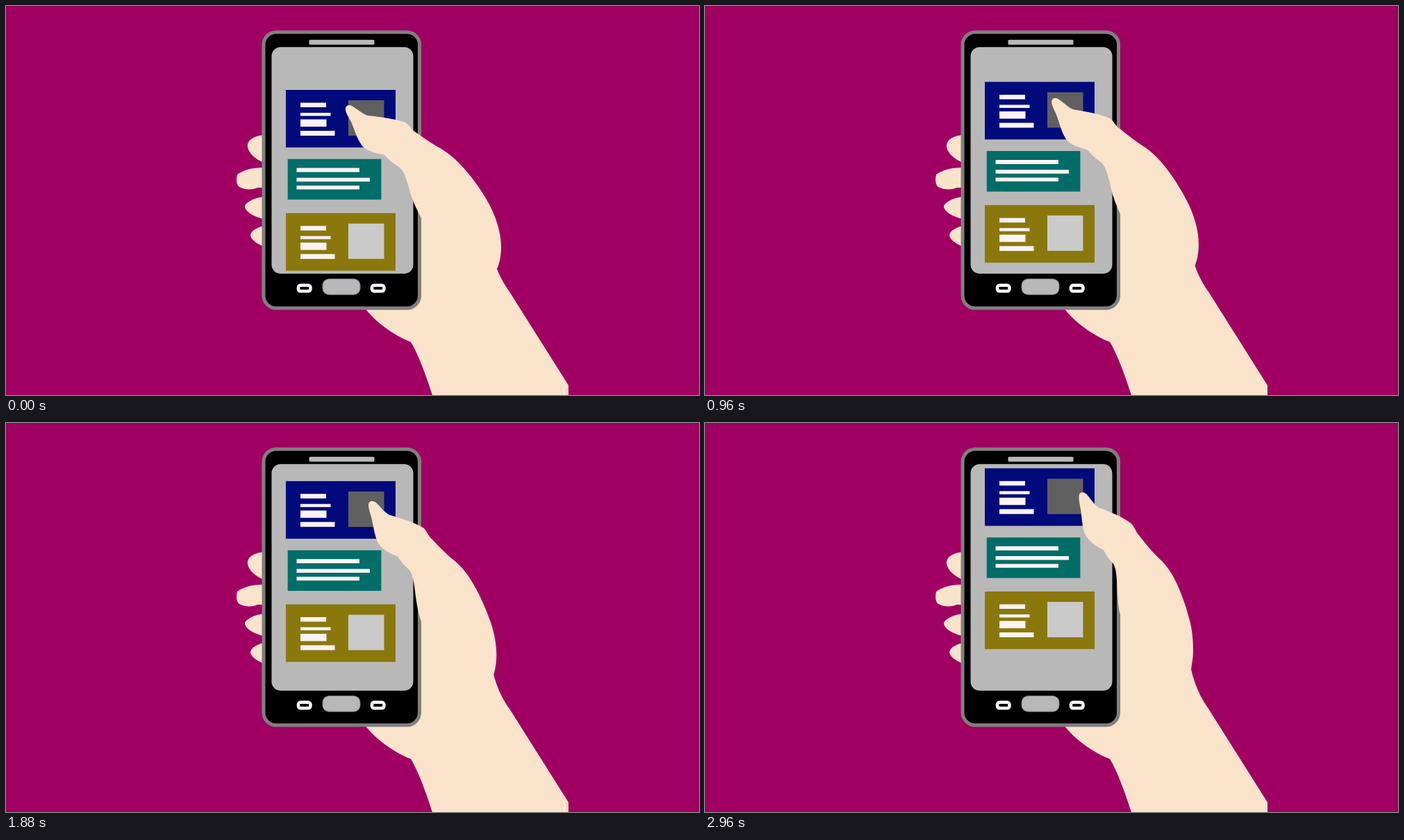
An HTML page that plays this animation: 998x561 px, repeating every 3 s.

```html
<!DOCTYPE html>
<html lang="en">
<head>
<meta charset="utf-8">
<title>Scrolling with the thumb</title>
<style>
  html, body { margin: 0; width: 100%; height: 100%; overflow: hidden; background: #a10063; }
  svg { display: block; width: 100vw; height: 100vh; }
  .skin { fill: #fae3cb; }
  .text { fill: #fdf3f4; }
  .grey { fill: #b8b8b8; }
</style>
</head>
<body>
<svg viewBox="0 0 998 561">
  <defs>
    <path id="lines" class="text" d="M21 18.5h37v6.5h-37z M21 33h43.5v4.5h-43.5z M21 42.5h37.5v10.5h-37.5z M21 59h49.5v7h-49.5z"/>
    <rect id="key" x="2.25" y="2.25" width="17.5" height="8.5" rx="3" fill="#000" stroke="#fff" stroke-width="4.5"/>
  </defs>

  <!-- fingers, palm and wrist behind the phone -->
  <g class="skin">
    <path d="M372 186C355 187 347 195 348 203C349 212 360 222 372 226z"/>
    <path d="M372 233C352 233 342 237 333 243C331 251 332 258 336 261C345 266 357 265 362 262H372z"/>
    <path d="M372 275C358 276 346 283 344 288C343 296 358 305 372 307z"/>
    <path d="M372 317C358 320 352 326 352 331C353 337 361 343 372 347z"/>
    <path d="M590 385H690L725 412L810 547V561H614C607 540 595 504 583 484.500C560 476 531 455 518 437V425z"/>
  </g>

  <!-- phone -->
  <rect x="371" y="37.700" width="224.500" height="398" rx="18" fill="#000" stroke="#808080" stroke-width="5"/>
  <rect class="grey" x="436.500" y="48.700" width="94" height="7" rx="1.500"/>
  <rect class="grey" x="382.500" y="59.300" width="204" height="326.700" rx="13"/>
  <rect class="grey" x="456" y="393.700" width="54" height="22.500" rx="9" stroke="#808080"/>
  <use href="#key" x="418.700" y="400.600"/>
  <use href="#key" x="524.700" y="400.600"/>

  <g id="feed">
    <g transform="translate(403 121)">
      <rect width="158" height="83" fill="#000a7a"/>
      <rect x="90" y="15" width="51.500" height="51" fill="#606060"/>
      <use href="#lines"/>
    </g>
    <rect x="405.700" y="220.700" width="134.700" height="58.500" fill="#006d68"/>
    <path class="text" d="M418.500 233.500h90.500v6h-90.500z M418.500 247.700h105.500v5.500h-105.500z M418.500 259h90.500v5.500h-90.500z"/>
    <g transform="translate(403 298.700)">
      <rect width="158" height="83" fill="#8a780d"/>
      <rect x="90" y="15" width="51.500" height="51" fill="#cacaca"/>
      <use href="#lines"/>
    </g>
  </g>

  <path id="thumb" class="skin"/>
</svg>
<script>
const LOOP = 3000, STEP = 40, DELAY = 57, SCROLL = 55.8;

// Matching outlines of the thumb and palm, low and raised
const low = `M598 306 C592 294 588 286 584 275 C578 256 575 240 567 233
  C560 228 554 225 545 215 C533 212 521 210 514 203 C505 192 502 178 497 167
  C492 158 488 152 489 147 C491 141 497 143 501 146 C508 150 514 156 521 158
  C540 160 562 163 575 168 C582 172 583 178 590 182 C604 192 616 200 627 206
  C652 221 676 252 692 279 C706 303 714 329 713 352 C712 364 711 371 707 379
  C712 392 718 402 725 412 L725 430 L598 430Z`;
const high = `M598 276 C595 266 595 258 594 245 C593 225 593 211 588 203
  C583 197 579 193 574 183 C563 178 552 170 547 160 C543 148 543 136 541 124
  C539 113 538 107 539 103 C542 98 547 100 550 103 C555 109 560 117 567 122
  C583 128 603 136 614 145 C619 150 620 157 626 163 C636 176 647 189 657 198
  C677 217 690 255 697 281 C702 297 703 317 703 328 C703 339 701 348 700 355
  C705 377 714 397 725 412 L725 430 L598 430Z`;
const numbers = path => path.match(/\d+/g).map(Number);
const from = numbers(low), to = numbers(high);
const feed = document.getElementById('feed');
const thumb = document.getElementById('thumb');

function thumbPath(p) {
  const bow = 0.16 * p * (1 - p); // points travel on a slight arc
  let i = 0;
  return low.replace(/\d+/g, () => {
    const k = i++;
    const lift = k % 2 ? (to[k - 1] - from[k - 1]) * bow : 0;
    return (from[k] + (to[k] - from[k]) * p - lift).toFixed(2);
  });
}

function draw(now) {
  const t = Math.floor(now % LOOP / STEP) * STEP;
  const u = Math.max(0, t - DELAY) / LOOP;
  const p = (1 - Math.cos(Math.PI * u)) / 2;
  feed.setAttribute('transform', `translate(0 ${-SCROLL * p})`);
  thumb.setAttribute('d', thumbPath(p));
}

const start = performance.now();
function tick() {
  draw(performance.now() - start);
  requestAnimationFrame(tick);
}
tick();
</script>
</body>
</html>
```
